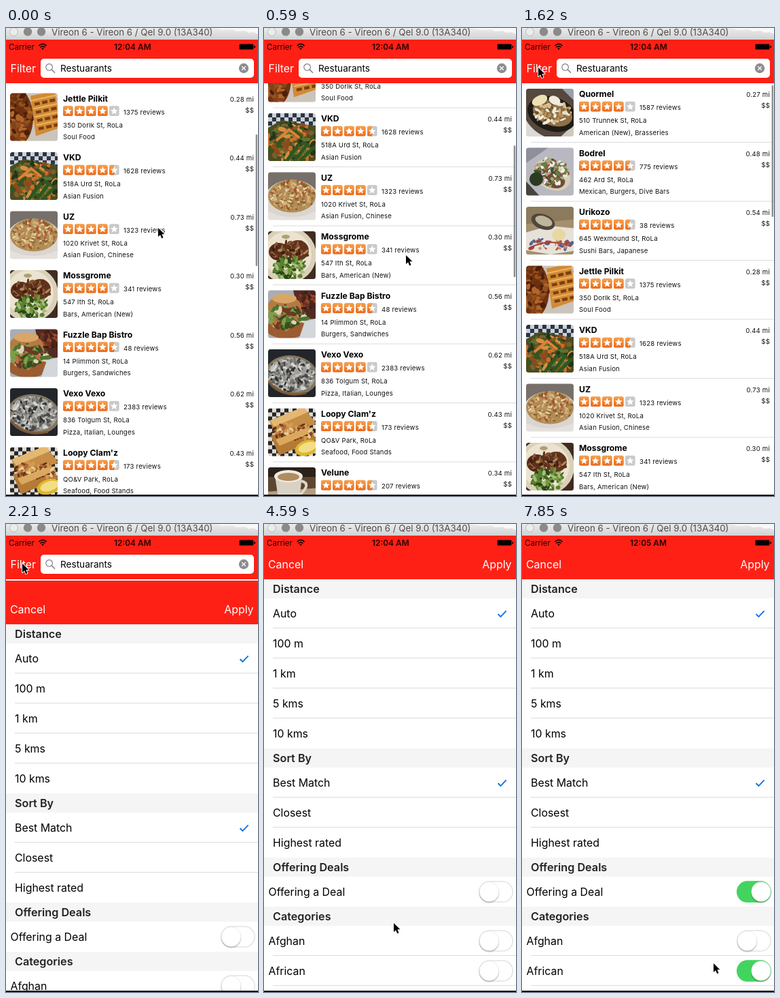
These frames come from a looping animation (371x686 px, 8000 ms). An HTML page:

```html
<!DOCTYPE html>
<html lang="en">
<head>
<meta charset="utf-8">
<title>Restaurant search</title>
<style>
html, body { margin: 0; width: 100%; height: 100%; overflow: hidden; background: #fff; }
svg { display: block; }
text { font-family: Inter, "Open Sans", sans-serif; font-size: 15.9px; fill: #000; }
.small { font-size: 9.6px; letter-spacing: .2px; fill: #111; }
.name { font-size: 12.2px; font-weight: 700; }
.head { font-size: 16.2px; font-weight: 600; fill: #222; }
.nav { fill: #fff; }
.end { text-anchor: end; }
</style>
</head>
<body>
<svg id="stage" width="371" height="686" viewBox="0 0 371 686"></svg>
<script>
const RED = '#ff2015', LINE = '#dcdcde', ROW = 86.5, TOP = 81;

// Drawing helpers
const rect = (x, y, w, h, fill, more = '') =>
  `<rect x="${x}" y="${y}" width="${w}" height="${h}" fill="${fill}" ${more}/>`;
const oval = (x, y, rx, ry, fill, turn = 0) =>
  `<ellipse cx="${x}" cy="${y}" rx="${rx}" ry="${ry}" fill="${fill}" transform="rotate(${turn} ${x} ${y})"/>`;
const path = (d, fill, more = '') => `<path d="${d}" fill="${fill}" ${more}/>`;
const stroke = (d, color, width, more = '') =>
  path(d, 'none', `stroke="${color}" stroke-width="${width}" ${more}`);
const text = (x, y, str, cls = '', more = '') => `<text x="${x}" y="${y}" class="${cls}" ${more}>${str}</text>`;

let seed = 7;
const rnd = () => (seed = (seed * 16807) % 2147483647) / 2147483647;

// Scatter small ovals inside an ellipse
function bits(n, x, y, rx, ry, size, colors) {
  const list = colors.split(' ');
  let out = '';
  for (let i = 0; i < n; i++) {
    const a = rnd() * 6.283, r = Math.sqrt(rnd());
    out += oval((x + Math.cos(a) * r * rx).toFixed(1), (y + Math.sin(a) * r * ry).toFixed(1),
      (size * (.6 + rnd() * .7)).toFixed(1), (size * (.3 + rnd() * .4)).toFixed(1),
      list[i % list.length], Math.round(rnd() * 180));
  }
  return out;
}
function checks(dark, light, size, h) {
  let out = rect(-4, -4, 80, h + 4, light);
  for (let y = 0; y < h; y += size)
    for (let x = (y / size % 2) * size; x < 72; x += size * 2) out += rect(x, y, size, size, dark);
  return out;
}
const ground = c => rect(-5, -5, 80, 80, c);

// Thumbnails, 70 by 70
const photos = [
  () => ground('#56483e') + path('M48 -5H75V22Z', '#9aa0a8') + path('M-5 34Q4 64 40 75H-5Z', '#dcdad6') +
    path('M75 48V75H46Z', '#cfc8bd') + oval(38, 37, 37, 25, '#1f1b18', 18) + oval(39, 36, 30, 18, '#8d7146', 18) +
    bits(60, 39, 36, 27, 15, 4, '#e9dfc8 #b78f55 #6d5230 #f3ecdc #d4bb8c') +
    oval(20, 17, 12, 7, '#ece0b4', -25) + oval(42, 17, 9, 6, '#f1ebdc', 25),
  () => ground('#b9b8c0') + path('M-5 -5H40L-5 26Z', '#8f8f9a') + path('M-5 44L24 75H-5Z', '#45443f') +
    oval(38, 40, 29, 21, '#d9cdb9', 28) + oval(36, 43, 23, 14, '#6d4f36', 28) +
    bits(100, 36, 36, 26, 19, 4, '#64803f #e6e6de #9db173 #c98fa0 #3a5228 #f1efe9 #8a6444') + oval(15, 46, 10, 10, '#2c3a24', 20),
  () => ground('#a4906f') + path('M-5 -5H75V18L-5 26Z', '#8c7a5d') + path('M-5 39L34 28L75 32V64L36 70L-5 63Z', '#e6e1d9') +
    bits(34, 36, 56, 33, 9, 4, '#b0433a #55628a #c98d78 #e9e4dc') + oval(25, 22, 18, 11, '#4e473a', 20) +
    oval(26, 21, 13, 7, '#bdb69c', 20) + oval(48, 41, 10, 9, '#e7d8a2') + stroke('M4 61Q32 45 66 58', '#a73d34', 2),
  () => ground('#cbc4ba') + oval(12, 36, 22, 40, '#70330f') + bits(90, 12, 37, 18, 36, 6, '#94511e #4a1f0a #b4652a #6d300f #82421a') +
    path('M30 4L66 -3L75 50L38 63Z', '#d18a35') +
    stroke('M33 17L70 9M35 29L72 21M37 41L74 33M39 53L76 45', '#7c3f12', 4.5, 'stroke-dasharray="8 3.5" stroke-dashoffset="-3"') +
    stroke('M31 11L68 3M34 23L72 15M36 35L74 27M38 47L76 39', '#ecb560', 1.8),
  () => checks('#30363f', '#c8d2de', 6, 36) + path('M-5 24L20 10L75 20V75H-5Z', '#4b4d22') +
    bits(130, 36, 43, 38, 29, 5.5, '#35561f #c9702a #22351a #7d5f2a #d98e40 #587532 #8f4a1e') +
    stroke('M26 72L46 44M37 72L59 44M47 70L67 50', '#2d5720', 5) + stroke('M12 40L31 24L46 36', '#dd8135', 4),
  () => ground('#77706a') + oval(35, 42, 41, 31, '#dad5cf') + oval(35, 35, 35, 24, '#b28c58') +
    bits(170, 35, 34, 33, 22, 3, '#d3b67e #a87a44 #e5d2a2 #86602f #a8532f #c49a5e') + path('M-5 55Q35 76 75 55V75H-5Z', '#e4e1dd'),
  () => ground('#3f2b20') + oval(29, 35, 42, 41, '#d9d0b8') + oval(29, 34, 35, 34, '#ebe3d0') + oval(16, 30, 15, 13, '#552c1b') +
    oval(44, 28, 16, 15, '#63351f') + bits(75, 31, 29, 28, 14, 4, '#42200f #86502f #9b6a42 #5c3019 #b08a5c') +
    bits(85, 32, 54, 23, 16, 4.5, '#42661f #72963f #29461a #588030 #a9bd78') + oval(26, 8, 6, 3, '#b09f74'),
  () => ground('#a9adb4') + path('M36 -5H75V42H46Z', '#532a22') + oval(58, 15, 17, 13, '#321f1a') +
    bits(40, 58, 15, 15, 11, 4, '#96482a #6b2f20 #4a241b') + oval(24, 24, 25, 16, '#b67a44') + oval(27, 56, 30, 15, '#9a5c30') +
    bits(100, 28, 39, 27, 16, 5.5, '#4f7530 #dcd2b4 #7f9f4a #6b3a24 #34501f #b5743e') +
    oval(24, 12, 18, 7, '#d9a668') + path('M54 46L75 40V75H44Z', '#d3d6da'),
  () => ground('#22262b') + oval(35, 38, 39, 29, '#84755f', 8) + oval(35, 37, 35, 25, '#9fa09d', 8) +
    bits(170, 35, 37, 34, 24, 3.2, '#d6d6d2 #62605c #34322f #bfc0bd #7b7973 #4b4a48') + stroke('M1 48Q22 72 56 64', '#7c5634', 3),
  () => checks('#282522', '#dddbd5', 6, 72) + path('M2 18L52 -2L71 22L14 46Z', '#c58d45') +
    path('M4 40L58 22L71 46L16 69Z', '#b57a36') + path('M3 18L52 -2L58 6L9 27Z', '#e5b872') +
    bits(70, 36, 34, 31, 11, 4, '#824522 #e6cd98 #b1683a #5a3018 #d59b52') + path('M11 46L56 29L60 37L17 55Z', '#dba95e') +
    oval(57, 58, 18, 11, '#dfb52f', -18) + oval(58, 57, 14, 7, '#f1de85', -18),
  () => ground('#5d4632') + path('M-5 -5H75V14H-5Z', '#2b211b') + path('M-5 36L75 30V75H-5Z', '#b39d80') +
    path('M10 12H50L45 58H17Z', '#d9d2c4') + oval(30, 13, 21, 9, '#f0ebe1') + oval(30, 14, 16, 6, '#b08c5e') +
    stroke('M49 20Q65 24 46 41', '#ddd5c7', 4)
];

// Name | stars | reviews | place | kinds | miles
const places = `Quormel|4|1587|510 Trunnek St, RoLa|American (New), Brasseries|0.27
Bodrel|4.5|775|462 Ard St, RoLa|Mexican, Burgers, Dive Bars|0.48
Urikozo|4.5|38|645 Wexmound St, RoLa|Sushi Bars, Japanese|0.54
Jettle Pilkit|4|1375|350 Dorlk St, RoLa|Soul Food|0.28
VKD|4.5|1628|518A Urd St, RoLa|Asian Fusion|0.44
UZ|4|1323|1020 Krivet St, RoLa|Asian Fusion, Chinese|0.73
Mossgrome|4|341|547 Ith St, RoLa|Bars, American (New)|0.30
Fuzzle Bap Bistro|4.5|48|14 Plimmon St, RoLa|Burgers, Sandwiches|0.56
Vexo Vexo|4|2383|836 Tolgum St, RoLa|Pizza, Italian, Lounges|0.62
Loopy Clam'z|4.5|173|QO&amp;V Park, RoLa|Seafood, Food Stands|0.43
Velune|4.5|207|||0.34`.split('\n').map(s => s.split('|'));

const starPoints = Array.from({ length: 10 }, (_, i) => {
  const r = i % 2 ? 2.6 : 5.7, a = i * Math.PI / 5;
  return (7.3 + r * Math.sin(a)).toFixed(2) + ',' + (7.7 - r * Math.cos(a)).toFixed(2);
}).join(' ');

function stars(score) {
  let out = '';
  for (let i = 0; i < 5; i++) {
    const fill = Math.max(0, Math.min(1, score - i));
    out += `<g transform="translate(${84 + i * 17} 26.8)">` + rect(0, 0, 14.6, 14.6, '#c9c9c9', 'rx="2.5"') +
      (fill ? path(fill < 1 ? 'M7.3 0H2.5Q0 0 0 2.5V12.1Q0 14.6 2.5 14.6H7.3Z'
        : 'M2.5 0H12.1Q14.6 0 14.6 2.5V12.1Q14.6 14.6 12.1 14.6H2.5Q0 14.6 0 12.1V2.5Q0 0 2.5 0Z', 'url(#orange)') : '') +
      `<polygon points="${starPoints}" fill="#fff"/></g>`;
  }
  return out;
}

const placeRow = ([name, score, count, street, kinds, miles], i) =>
  `<g transform="translate(0 ${TOP + i * ROW})">
  <g transform="translate(6 8)" clip-path="url(#thumb)"><g filter="url(#soft)">${photos[i]()}</g></g>` +
  text(84, 20.2, name, 'name') + stars(+score) + text(173, 39.2, count + ' reviews', 'small') +
  text(84, 58.4, street, 'small') + text(84, 75.6, kinds, 'small') +
  text(365, 20, miles + ' mi', 'small end') + text(365, 36, '$$', 'small end') + '</g>';

const hairlines = places.map((_, i) => rect(13, TOP + (i + 1) * ROW - .5, 358, 1, LINE)).join('');

// Filter form
const section = (y, label) => rect(0, y, 371, 28, '#f5f5f6') + text(13, y + 20.3, label, 'head');
const option = (x, y, label) => text(x, y + 27.7, label);
const divider = y => rect(13, y - 1, 358, 1, LINE);
const tick = y => stroke(`M344.5 ${y + 1}l3.9 3.9l8.2 -8.6`, '#1273e6', 1.9);
const toggle = (id, y) => `<g id="${id}" transform="translate(316 ${y})">` +
  rect(.75, .75, 49.5, 30, '#fff', 'rx="15" stroke="#e3e3e5" stroke-width="1.5"') +
  rect(0, 0, 51, 31.5, '#43d45f', 'rx="15.7" class="on"') +
  `<g class="knob"><circle cx="15.5" cy="17.6" r="14.8" fill="#000" opacity=".16" filter="url(#soft)"/>
  <circle cx="15.5" cy="15.7" r="14.4" fill="#fff" stroke="#000" stroke-opacity=".13" stroke-width=".6"/></g></g>`;

function group(y, title, labels, x = 13) {
  return section(y, title) + labels.map((s, i) =>
    option(x, y + 28 + i * 44, s) + (i ? divider(y + 28 + i * 44) : '')).join('');
}

const form = rect(0, 17, 371, 669, '#fff') + rect(0, 17, 371, 64, RED) +
  text(6, 65, 'Cancel', 'nav') + text(364.5, 65, 'Apply', 'nav end') +
  group(81, 'Distance', ['Auto', '100 m', '1 km', '5 kms', '10 kms']) + tick(131) +
  group(329, 'Sort By', ['Best Match', 'Closest', 'Highest rated']) + tick(379) +
  group(489, 'Offering Deals', ['Offering a Deal'], 6.5) +
  group(561, 'Categories', ['Afghan', 'African'], 6.5) + divider(677) +
  toggle('deal', 523.3) + toggle('afghan', 595.3) + toggle('african', 639.3);

const searchBar = rect(0, 17, 371, 64, RED) + text(6.5, 65, 'Filter', 'nav') +
  rect(51, 45, 314, 28, '#fff', 'rx="5"') +
  '<circle cx="63.6" cy="57.4" r="4.8" fill="none" stroke="#77777b" stroke-width="1.1"/>' +
  stroke('M67.2 61L72 65.8', '#77777b', 1.3) + text(80, 64, 'Restuarants', '', 'style="font-size:13.6px"') +
  oval(350, 59, 7.2, 7.2, '#8c8c91') + stroke('M347.2 56.2l5.6 5.6m0-5.6l-5.6 5.6', '#fff', 1.3);

const statusBar = text(4, 31.6, 'Carrier', '', 'style="font-size:11.6px;fill:#240302"') +
  stroke('M48.4 26.1Q54 20.8 59.6 26.1M50.5 28.4Q54 25.2 57.5 28.4', '#160100', 1.6) + path('M52.2 30L54 32L55.8 30Q54 28.4 52.2 30Z', '#160100') +
  text(159, 31.6, '12:04 AM', '', 'id="clock" style="font-size:11.9px;font-weight:600;fill:#240302"') +
  rect(343.5, 23.5, 21, 8, '#000', 'rx="1.5"') + rect(365.4, 26, 1.6, 3.2, '#000', 'rx=".8"');

const titleBar = rect(0, 0, 371, 17, 'url(#chrome)') + path('M305 0H371V9L364 6L357 7L351 4L341 5L333 2L320 3Z', '#f8f8f8') +
  '<circle cx="11.5" cy="5.5" r="6" fill="#ececec" stroke="#b9b9b9"/>' +
  oval(32, 5.5, 6.2, 6.2, '#8a8a8a') + oval(52, 5.5, 6.2, 6.2, '#8a8a8a') +
  text(67, 11, 'Vireon 6 - Vireon 6 / Qel 9.0 (13A340)', '', 'style="font-size:13.3px;fill:#4c4c4c"');

const arrow = 'M0 0V13L3.1 10.2L5.2 15.2L7.5 14.2L5.4 9.3H9.4Z';

document.getElementById('stage').innerHTML = `<defs>
  <clipPath id="thumb"><rect width="70" height="70" rx="3.5"/></clipPath>
  <clipPath id="view"><rect y="17" width="371" height="667"/></clipPath>
  <filter id="soft" x="-20%" y="-20%" width="140%" height="140%"><feGaussianBlur stdDeviation=".7"/></filter>
  <linearGradient id="orange" x2="0" y2="1"><stop stop-color="#f8a04c"/><stop offset="1" stop-color="#ec6a1a"/></linearGradient>
  <linearGradient id="chrome" x2="0" y2="1"><stop stop-color="#ebebeb"/><stop offset="1" stop-color="#d2d2d2"/></linearGradient>
  </defs><g clip-path="url(#view)">` + rect(0, 17, 371, 669, '#fff') +
  `<g id="list">${places.map(placeRow).join('')}<g id="hairlines">${hairlines}</g></g>` +
  rect(367.6, 84, 2.6, 193, '#8f8f8f', 'id="bar" rx="1.3"') + searchBar + `<g id="form">${form}</g>` + statusBar + '</g>' +
  titleBar + rect(0, 684, 371, 2, '#111') +
  `<g id="cursor">${path(arrow, '#000', 'stroke="#fff" stroke-width="1.8" stroke-linejoin="round" paint-order="stroke"')}</g>`;

// Motion: [step, value...] keys, linear in between
const LOOP = 8000, STEP = 147.8;
const scroll = [[0, 253], [1, 284], [2, 300], [3, 308], [4, 310], [5, 248], [6, 130], [7, 21], [8, -15], [9, -6], [10, 0]];
const sheet = [[12, 669], [13, 610], [14, 290], [15, 66], [16, 5], [17, 0]];
const barFade = [[11, 1], [13, 0]];
const dealOn = [[42, 0], [45, 1]];
const africanOn = [[50, 0], [52, 1]];
const pointer = [[0, 224, 293], [4, 209, 333], [5, 205, 398], [6, 196, 380], [7, 170, 245], [8, 137, 115],
  [10, 32, 63], [11, 24, 58], [17, 24, 58], [20, 110, 238], [21, 120, 255], [23, 119, 262], [24, 119, 262],
  [28, 140, 607], [30, 140, 607], [32, 242, 563], [33, 242, 563], [37, 328, 555], [39, 328, 555],
  [40, 329, 555], [45, 329, 555], [48, 336, 646], [51, 336, 646], [53, 282, 644]];

function at(keys, k) {
  const j = keys.findIndex(key => key[0] > k);
  if (j === 0) return keys[0].slice(1);
  if (j < 0) return keys[keys.length - 1].slice(1);
  const a = keys[j - 1], b = keys[j], u = (k - a[0]) / (b[0] - a[0]);
  return a.slice(1).map((v, i) => v + (b[i + 1] - v) * u);
}

const $ = id => document.getElementById(id);
const move = (el, x, y) => el.setAttribute('transform', `translate(${x} ${y})`);
function setToggle(id, p) {
  $(id).querySelector('.on').setAttribute('opacity', p);
  move($(id).querySelector('.knob'), 20.5 * p, 0);
}

function draw(k) {
  const [s] = at(scroll, k), [y] = at(sheet, k);
  move($('list'), 0, -s);
  // Hairlines only survive on whole device pixels
  $('hairlines').setAttribute('visibility', s % 2 ? 'hidden' : 'visible');
  $('bar').setAttribute('y', 84 + Math.max(0, s) * .285);
  $('bar').setAttribute('height', 193 + Math.min(0, s));
  $('bar').setAttribute('opacity', at(barFade, k)[0]);
  move($('form'), 0, y);
  $('clock').textContent = k < 34 ? '12:04 AM' : '12:05 AM';
  setToggle('deal', at(dealOn, k)[0]);
  setToggle('afghan', 0);
  setToggle('african', at(africanOn, k)[0]);
  move($('cursor'), ...at(pointer, k));
}

const start = performance.now();
let last = -1;
function tickFrame() {
  const t = (performance.now() - start) % LOOP;
  const k = Math.floor((t + 12) / STEP);
  if (k !== last) draw(last = k);
  requestAnimationFrame(tickFrame);
}
tickFrame();
</script>
</body>
</html>
```
